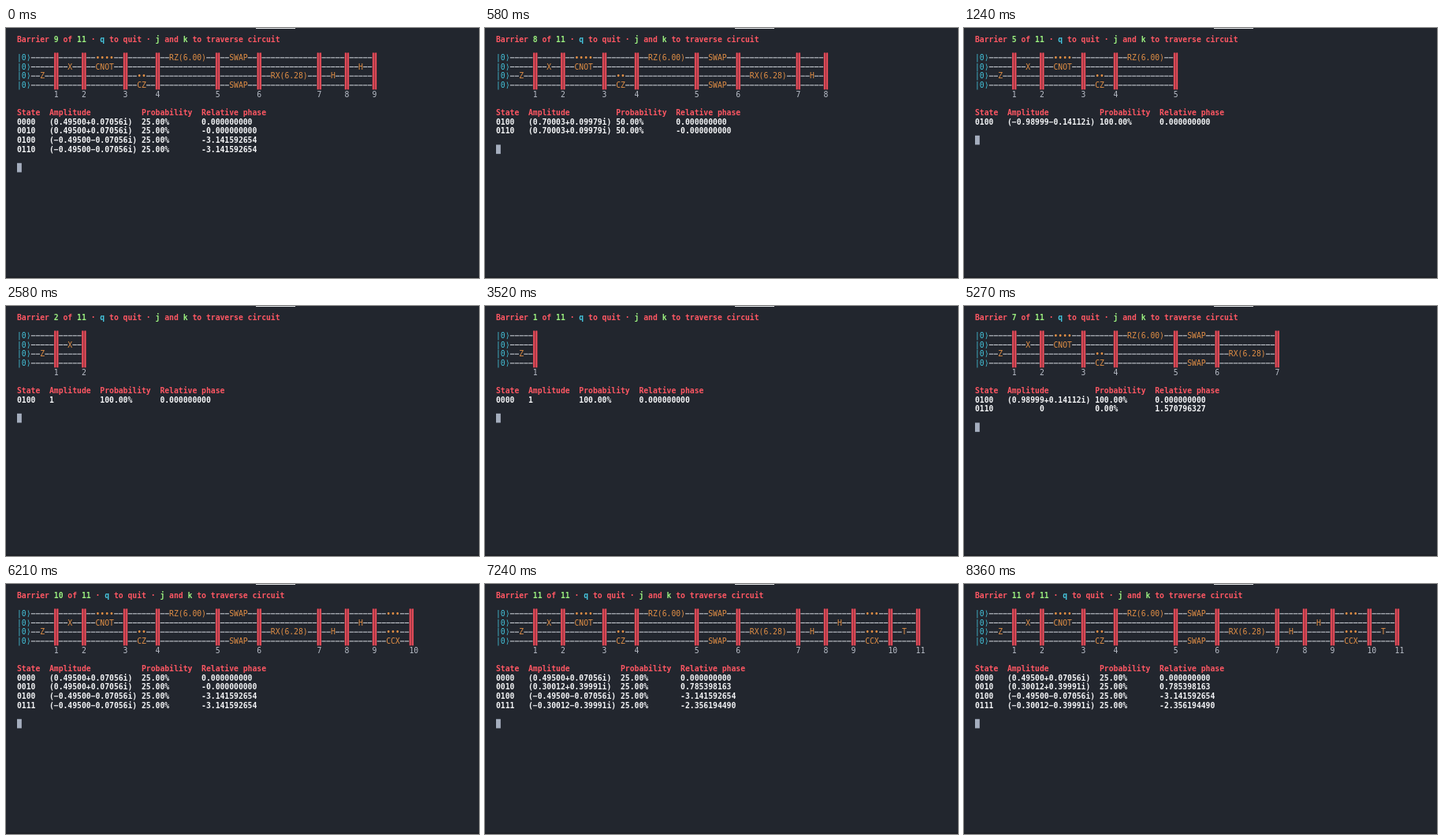
Write an HTML page with a canvas that moves like this. It is 600 px wide and 318 px high and loops after 8.39 s.

```html
<!DOCTYPE html>
<html lang="en">
<head>
<meta charset="utf-8">
<title>Circuit stepper</title>
<style>
html, body { margin: 0; width: 100%; height: 100%; overflow: hidden; background: #22262e; }
canvas { display: block; }
</style>
</head>
<body>
<canvas id="stage" width="600" height="318"></canvas>
<script>
const ctx = document.getElementById("stage").getContext("2d");
const LOOP = 8390, LEFT = 14, CELL = 5.852, TOP = 14, PITCH = 11.67;
const RED = "#ff5763", GREEN = "#9bf07f", CYAN = "#45c4dc", ORANGE = "#e08e45",
      WHITE = "#f4f5f7", GRAY = "#b9bec8", WIRE = "#c5c9d0";

// [time, barrier shown from then on]
const STEPS = [[0, 9], [330, 8], [630, 7], [920, 6], [1215, 5], [1560, 4], [1900, 3], [2240, 2],
  [2640, 1], [3610, 2], [3950, 3], [4240, 4], [4540, 5], [4840, 6], [5150, 7], [5460, 8],
  [5770, 9], [6090, 10], [6500, 11]];

// Each section maps wire numbers to gate labels
const SECTIONS = [
  { 2: "Z" }, { 1: "X" }, { 0: "••••", 1: "CNOT" }, { 2: "••", 3: "CZ" }, { 0: "RZ(6.00)" },
  { 0: "SWAP", 3: "SWAP" }, { 2: "RX(6.28)" }, { 2: "H" }, { 1: "H" },
  { 0: "•••", 2: "•••", 3: "CCX" }, { 2: "T" }
];

const ZERO = "0.000000000", PI = "-3.141592654";
const quarter = (state, amplitude, phase) => [state, amplitude, "25.00%", phase];
const whole = (state, amplitude) => [[state, amplitude, "100.00%", ZERO]];
const POS = "(0.49500+0.07056i)", NEG = "(−0.49500−0.07056i)", HALF = "(0.70003+0.09979i)";

function tableRows(n) {
  if (n === 1) return whole("0000", "1");
  if (n < 5) return whole("0100", "1");
  if (n < 7) return whole("0100", "(−0.98999−0.14112i)");
  if (n === 7) return [...whole("0100", "(0.98999+0.14112i)"),
    ["0110", "       0", "0.00%", "1.570796327"]];
  if (n === 8) return [["0100", HALF, "50.00%", ZERO], ["0110", HALF, "50.00%", "-" + ZERO]];
  const turned = n === 11;
  return [
    quarter("0000", POS, ZERO),
    quarter("0010", turned ? "(0.30012+0.39991i)" : POS, turned ? "0.785398163" : "-" + ZERO),
    quarter("0100", NEG, PI),
    quarter(n === 9 ? "0110" : "0111", turned ? "(−0.30012−0.39991i)" : NEG,
      turned ? "-2.356194490" : PI)
  ];
}

const colX = col => LEFT + col * CELL;
const rowY = row => TOP + row * PITCH;

function rect(color, x, y, w, h) {
  ctx.fillStyle = color;
  ctx.fillRect(x, y, w, h);
}

function write(text, col, row, color, bold) {
  ctx.font = `${bold ? "bold " : ""}9.72px "DejaVu Sans Mono", monospace`;
  ctx.fillStyle = color;
  [...text].forEach((ch, i) => {
    if (ch !== " ") ctx.fillText(ch, colX(col + i), rowY(row) + 3.6);
  });
  return col + text.length;
}

function drawTitle(n) {
  const parts = [["Barrier ", RED], [String(n), GREEN], [" of ", RED], ["11", GREEN], [" · ", RED],
    ["q", CYAN], [" to quit · ", RED], ["j", GREEN], [" and ", RED], ["k", GREEN],
    [" to traverse circuit", RED]];
  parts.reduce((col, [text, color]) => write(text, col, 0, color, true), 0);
}

function drawWire(from, to, row) {
  for (let col = from; col < to; col++) rect(WIRE, colX(col) + 0.2, rowY(row) - 0.1, CELL - 0.5, 1.1);
}

function drawBarrier(col) {
  const x = colX(col), y = rowY(2) - 5.8, h = 4 * PITCH;
  rect("#a43744", x + 0.2, y, CELL - 0.4, h);
  rect("#f4525f", x + 0.5, y, 1.4, h);
  rect("#f4525f", x + CELL - 1.9, y, 1.4, h);
}

function drawCircuit(n) {
  for (let wire = 0; wire < 4; wire++) write("|0⟩", 0, wire + 2, CYAN);
  let col = 3;
  SECTIONS.slice(0, n).forEach((gates, i) => {
    const size = Math.max(...Object.values(gates).map(g => g.length));
    const end = col + size + 4;
    for (let wire = 0; wire < 4; wire++) {
      const gate = gates[wire], row = wire + 2;
      if (!gate) {
        drawWire(col, end, row);
        continue;
      }
      drawWire(col, col + 2, row);
      drawWire(end - 2, end, row);
      write(gate, col + 2, row, ORANGE);
    }
    drawBarrier(end);
    write(String(i + 1), end, 6, GRAY);
    col = end + 1;
  });
}

function drawTable(n) {
  const rows = tableRows(n);
  const widest = Math.max(...rows.map(r => r[1].length));
  const probability = 7 + Math.max(11, widest + 1);
  const columns = [0, 7, probability, probability + 13];
  const line = (cells, row, color) => cells.forEach((c, i) => write(c, columns[i], row, color, true));
  line(["State", "Amplitude", "Probability", "Relative phase"], 8, RED);
  rows.forEach((cells, i) => line(cells, 9 + i, WHITE));
  rect("#a5aebe", LEFT, rowY(10 + rows.length) - 5.6, CELL, 11.7);
}

function draw(time) {
  const n = STEPS.filter(([start]) => start <= time).pop()[1];
  rect("#22262e", 0, 0, 600, 318);
  rect("#1e2128", 0, 316, 600, 2);
  rect("#e4e6e8", 317, 0, 50, 1);
  drawTitle(n);
  drawCircuit(n);
  drawTable(n);
}

const begun = performance.now();
function tick() {
  draw((performance.now() - begun) % LOOP);
  requestAnimationFrame(tick);
}
tick();
</script>
</body>
</html>
```
